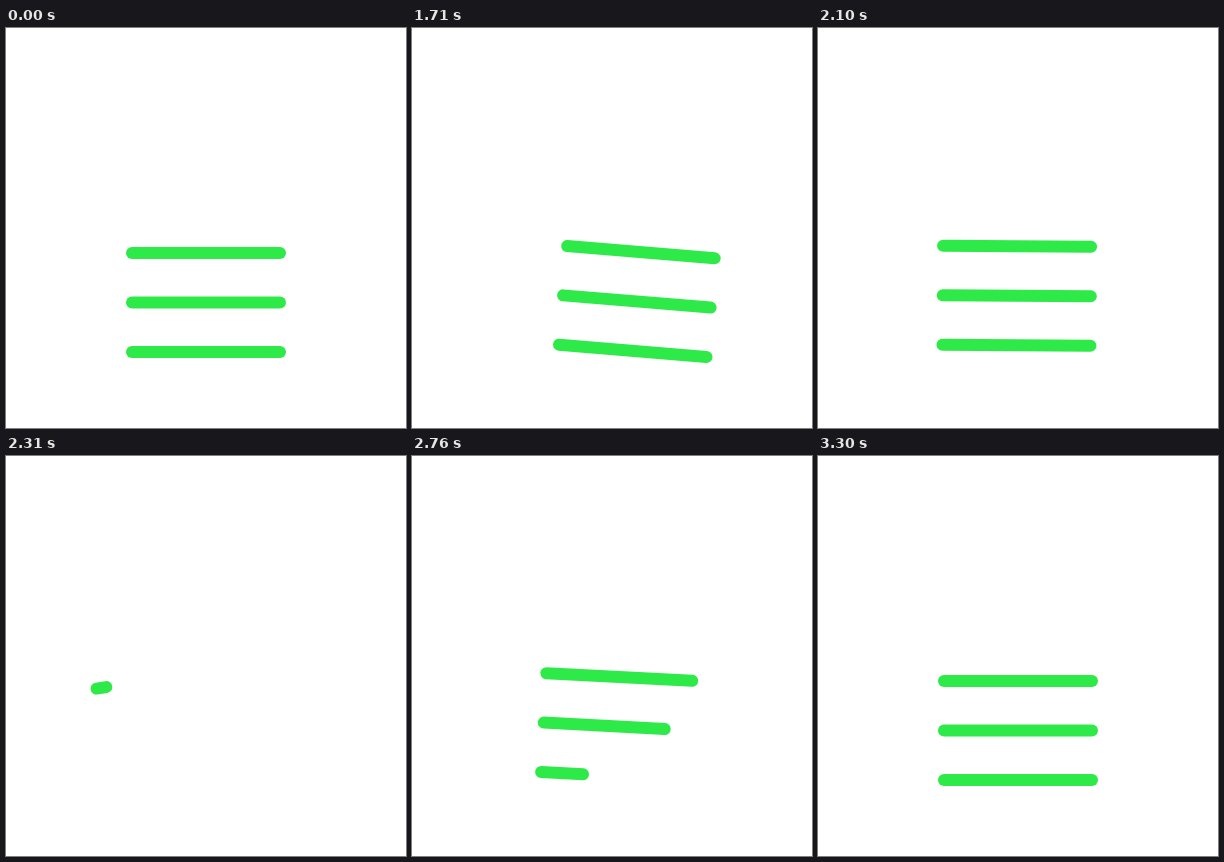
An HTML page with a canvas for the animation above (3330 ms loop, 400x400 px).

```html
<!DOCTYPE html>
<html lang="en">
<head>
<meta charset="utf-8">
<title>Menu lines</title>
<style>
html, body { margin: 0; width: 100%; height: 100%; overflow: hidden; background: #fff; }
canvas { display: block; width: 400px; height: 400px; }
</style>
</head>
<body>
<canvas id="stage" width="400" height="400"></canvas>
<script>
const ctx = document.getElementById('stage').getContext('2d');
const LOOP = 3330, STEP = 30;
const HALF = 74, GAP = 49.5, CX = 200, CY = 274.5;
const HIDE = 2160, REST = 3300;
const DRAW = 2296, STAGGER = 200, DRAW_TIME = 608;
const LEAD = 15; // the sideways shift runs slightly ahead of the tilt

const pose = (x, y, deg) => ({ x, y, deg });
const home = pose(0, 0, 0);
const right = pose(44, -2, 9.3);
const exit = pose(-40, -12, -9.3);
const enter = pose(-29, -4.3, -8.8);
const rebound = pose(10, -7.5, 4.9);

// The lines are hidden when the pose jumps from exit to enter.
const swings = [
  { begin: 1505, end: 1910, from: home, to: right, sag: 0 },
  { begin: 1910, end: 2300, from: right, to: exit, sag: 0 },
  { begin: 2300, end: 2900, from: enter, to: rebound, sag: 6.4 },
  { begin: 2900, end: REST, from: rebound, to: home, sag: 0 }
];

const clamp = v => Math.min(1, Math.max(0, v));
const smooth = u => u * u * (3 - 2 * u);
const cubicOut = u => 1 - (1 - u) ** 3;
const mix = (a, b, p) => a + (b - a) * p;

function swingAt(t) {
  const s = swings.find(w => t < w.end) || swings[swings.length - 1];
  const p = smooth(clamp((t - s.begin) / (s.end - s.begin)));
  return pose(
    mix(s.from.x, s.to.x, p),
    mix(s.from.y, s.to.y, p) + s.sag * 4 * p * (1 - p),
    mix(s.from.deg, s.to.deg, p)
  );
}

function drawn(i, t) {
  if (t < HIDE || t >= REST) return 1;
  return cubicOut(clamp((t - DRAW - i * STAGGER) / DRAW_TIME));
}

function render(t) {
  const { y, deg } = swingAt(t);
  const { x } = swingAt(t + LEAD);
  ctx.setTransform(1, 0, 0, 1, 0, 0);
  ctx.fillStyle = '#fff';
  ctx.fillRect(0, 0, 400, 400);
  ctx.translate(CX + x, CY + y);
  ctx.rotate(deg * Math.PI / 180);
  ctx.strokeStyle = '#2eea48';
  ctx.lineWidth = 12;
  ctx.lineCap = 'round';
  for (let i = 0; i < 3; i++) {
    const part = drawn(i, t);
    if (part <= 0) continue;
    const lineY = (i - 1) * GAP;
    ctx.beginPath();
    ctx.moveTo(-HALF, lineY);
    ctx.lineTo(-HALF + 2 * HALF * part, lineY);
    ctx.stroke();
  }
}

const start = performance.now();
function tick() {
  const t = (performance.now() - start) % LOOP;
  render(Math.floor(t / STEP) * STEP);
  requestAnimationFrame(tick);
}
tick();
</script>
</body>
</html>
```
